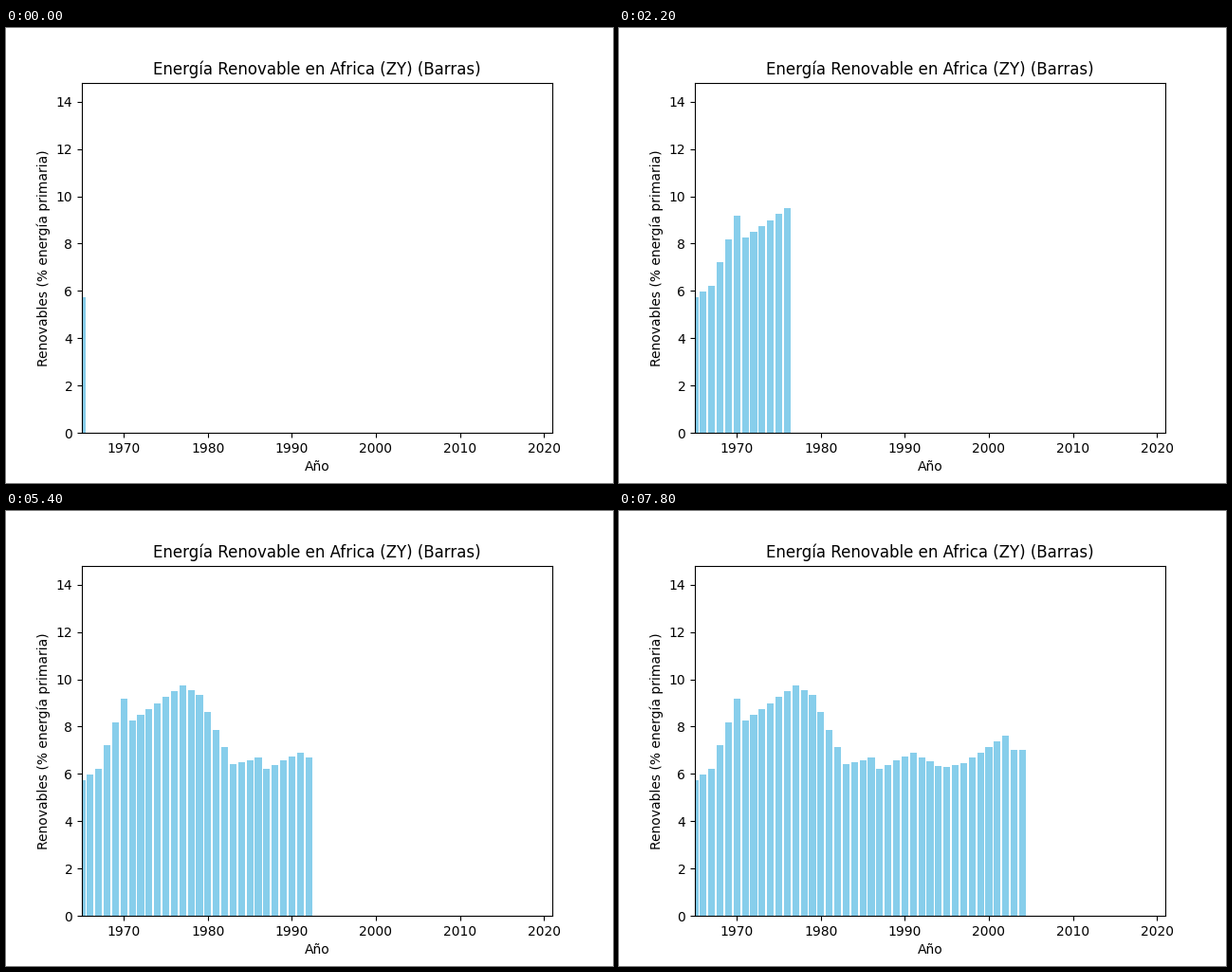
Animation, 640 px wide and 480 px high, one loop 8 s. Source, as a matplotlib script:

```python
import matplotlib.pyplot as plt
import numpy as np
from matplotlib.animation import FuncAnimation

START, END, LAST = 1965, 2021, 2004
STEP_MS = 200

# Turning points (year, share); the years between follow straight lines
TURNS = [
    (1965, 5.74), (1967, 6.23), (1970, 9.17), (1971, 8.25), (1977, 9.75),
    (1979, 9.33), (1983, 6.42), (1986, 6.68), (1987, 6.22), (1991, 6.90),
    (1994.5, 6.25), (1997, 6.46), (2002, 7.60), (2003, 7.00),
]

years = np.arange(START, LAST + 1)
share = np.interp(years, *zip(*TURNS))

fig, ax = plt.subplots(figsize=(6.4, 4.8), dpi=100)
ax.set_title("Energía Renovable en Africa (ZY) (Barras)")
ax.set_xlabel("Año")
ax.set_ylabel("Renovables (% energía primaria)")

bars = ax.bar(years, share, color="skyblue")
ax.set_xlim(START, END)
ax.set_ylim(0, 14.804)


def update(step):
    """Show every bar up to the current year."""
    for i, bar in enumerate(bars):
        bar.set_visible(i <= step)
    return list(bars)


def reset():
    return update(0)


anim = FuncAnimation(fig, update, frames=len(years), init_func=reset,
                     interval=STEP_MS, repeat=True, repeat_delay=0)
plt.show()
```
